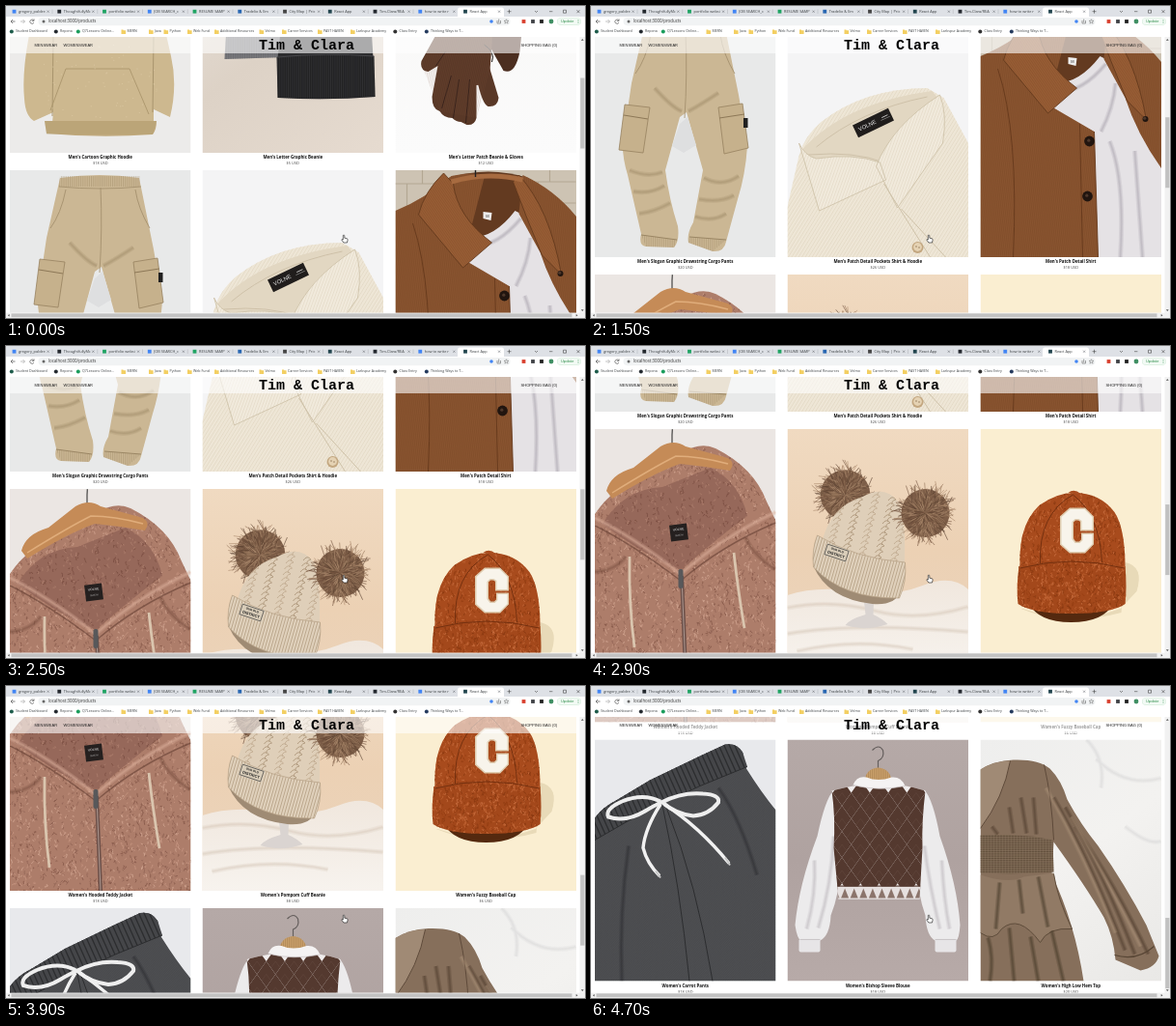
Recreate the animation shown at these times as an HTML page with a canvas. Size 600x323 px, loop 5 s.

```html
<!DOCTYPE html>
<html lang="en">
<head>
<meta charset="utf-8">
<title>React App</title>
<style>
html, body { margin: 0; width: 100%; height: 100%; overflow: hidden; background: #fff; }
canvas { display: block; width: 100vw; height: 100vh; }
</style>
</head>
<body>
<canvas id="stage"></canvas>
<script>
const W = 600, H = 323, LOOP = 5000, STEP = 100;
const CARD_W = 187.5, CARD_H = 250, PITCH = 268, FIRST_TOP = -98;
const COLS = [4, 203.5, 403.5];
const UI = '"Open Sans", "Noto Sans", sans-serif';
const SANS = '"Liberation Sans", Arial, sans-serif';
const MONO = '"Liberation Mono", "Courier New", monospace';

const canvas = document.getElementById('stage');
const c = canvas.getContext('2d');
const ratio = window.devicePixelRatio || 1;
canvas.width = W * ratio;
canvas.height = H * ratio;

// time, scroll offset
const SCROLL = [[0, 0], [600, 71], [800, 92], [900, 92], [1000, 96], [1100, 96],
  [1500, 160], [2000, 236], [2100, 248], [2200, 248], [2500, 290], [3300, 414],
  [3400, 424], [3500, 428], [3600, 428], [3700, 438], [3900, 476], [4600, 640], [4700, 650.5], [5000, 650.5]];

function scrollAt(t) {
  const i = SCROLL.findIndex(k => k[0] > t);
  const [t0, s0] = SCROLL[i - 1], [t1, s1] = SCROLL[i];
  return s0 + (s1 - s0) * (t - t0) / (t1 - t0);
}

let seed = 1;
const rnd = (a = 0, b = 1) => {
  seed = (seed * 16807) % 2147483647;
  return a + (b - a) * seed / 2147483647;
};

const rect = (x, y, w, h, col) => { c.fillStyle = col; c.fillRect(x, y, w, h); };
const fill = (d, col) => { c.fillStyle = col; c.fill(new Path2D(d)); };
const line = (d, col, w = 0.7) => { c.strokeStyle = col; c.lineWidth = w; c.stroke(new Path2D(d)); };
function pill(x, y, w, h, r, col) {
  c.fillStyle = col;
  c.beginPath();
  c.roundRect(x, y, w, h, r);
  c.fill();
}
function dot(x, y, r, col) {
  c.fillStyle = col;
  c.beginPath();
  c.arc(x, y, r, 0, 7);
  c.fill();
}
function text(s, x, y, size, col = '#333', align = 'left', font = UI, weight = 400) {
  c.font = `${weight} ${size}px ${font}`;
  c.textAlign = align;
  c.textBaseline = 'middle';
  c.fillStyle = col;
  c.fillText(s, x, y);
}
function within(d, draw) {
  c.save();
  c.clip(new Path2D(d));
  draw();
  c.restore();
}
function turned(x, y, a, draw) {
  c.save();
  c.translate(x, y);
  c.rotate(a);
  draw();
  c.restore();
}
function fade(stops, x1 = 0, y1 = CARD_H) {
  const g = c.createLinearGradient(0, 0, x1, y1);
  stops.forEach((s, i) => g.addColorStop(i / (stops.length - 1), s));
  return g;
}
const backdrop = col => rect(0, 0, CARD_W, CARD_H, col);

// Parallel fabric ribs inside a shape
function ribs(d, col, gap, angle = 0, w = 0.5) {
  within(d, () => turned(94, 125, angle, () => {
    for (let x = -170; x < 170; x += gap) line(`M${x},-170V170`, col, w);
  }));
}
// Soft wide folds along a path
function folds(d, col) {
  for (const w of [5, 2.8, 1.2]) line(d, col, w);
}
function fleece(d, base, cols, n, x0, y0, x1, y1) {
  fill(d, base);
  within(d, () => {
    for (let i = 0; i < n; i++) {
      const x = rnd(x0, x1), y = rnd(y0, y1);
      line(`M${x},${y}q${rnd(-3, 3)},${rnd(-3, 3)} ${rnd(-2, 2)},${rnd(0, 4)}`, cols[i % cols.length], 0.9);
    }
  });
}
function pompom(x, y, r) {
  dot(x, y, r * 0.78, '#7d5e48');
  const cols = ['#5b4232', '#94745a', '#ab8a6d', '#72533f'];
  for (let i = 0; i < 420; i++) {
    const a = rnd(0, 6.283), p = rnd(0, 0.75) * r, q = p + rnd(0.15, 0.4) * r, b = a + rnd(-0.3, 0.3);
    line(`M${x + p * Math.cos(a)},${y + p * Math.sin(a)}L${x + q * Math.cos(b)},${y + q * Math.sin(b)}`, cols[i % 4], 0.6);
  }
}
function tag(x, y, a, w, h, name) {
  turned(x, y, a, () => {
    rect(-w / 2, -h / 2, w, h, '#201d1c');
    text(name, -w / 6, 0, w / 7, '#eee', 'center', SANS);
    rect(w / 4, -1.5, w / 6, 0.8, '#ccc');
    rect(w / 5, 1, w / 4, 0.6, '#999');
  });
}

function hoodie() {
  backdrop('#ecebea');
  fill('M22,118Q12,165 15,194Q16,212 25,217L45,208L43,230H149L149,205L166,213Q174,180 167,150L158,110Z', '#cdb88f');
  line('M45,130L44,212M149,130L148,208', '#a8946d', 1);
  line('M58,163H124L144,210M58,163L42,206', '#ab966d', 0.9);
  fill('M36,217H152Q152,226 148,231Q94,235 38,230Z', '#c1aa7e');
  ribs('M36,217H152L148,231H38Z', '#a9946b', 2);
  within('M22,118H160L149,215H43Z', () => {
    for (let i = 0; i < 90; i++) dot(rnd(25, 155), rnd(128, 214), 0.5, '#dcc9a4');
  });
}
function letterBeanie() {
  backdrop(fade(['#e8e2dc', '#ddd2c6', '#e6dbd0'], CARD_W, CARD_H));
  const grey = 'M26,100H120V150L23,153Z', cuff = 'M77,151Q128,146 178,150L179,192Q130,196 78,193Z';
  fill(grey, '#77777b');
  ribs(grey, '#626267', 2.4);
  fill('M84,100H174L177,152H78Z', '#2d2d2f');
  fill(cuff, '#222223');
  ribs(cuff, '#3f3f42', 2.2);
  line('M78,151Q128,146 178,150', '#464649', 1);
}
function gloves() {
  backdrop(fade(['#f7f6f5', '#fbfbfb']));
  const brown = '#593827';
  fill('M96,95H134L129,145Q124,170 112,165L95,135Z', '#4c2e20');
  fill('M52,110H102L98,165Q94,180 84,180L84,214Q82,222 74,221L68,218Q63,218 59,214Q50,214 46,207Q38,205 38,192L44,160L34,166Q25,165 27,155Z', brown);
  fill('M84,172Q90,200 96,202Q106,203 107,193L94,150Z', brown);
  line('M48,204L58,170M60,214L66,174M73,219L77,174M42,160L52,145', '#36211a', 1);
  ribs('M52,110H102L98,165L84,214L46,207L27,158Z', 'rgba(125,85,63,.35)', 1.8, 0.2);
  line('M92,138Q104,146 100,156', '#1d1715', 1);
}

function cargoPants() {
  backdrop('#e8e9e9');
  fill('M52,8Q93,2 134,8L149,82L158,135Q156,165 148,190L136,234Q134,245 122,244L97,235Q95,226 102,214L112,160L95,100L88,105L73,160Q77,190 86,218Q88,233 82,240L53,239Q45,238 48,226L34,165Q28,145 29,130L38,70Z', '#cbb794');
  fill('M88,112L80,135L92,142L105,134L96,105Z', '#dedfe0');
  ribs('M52,6H135V17H51Z', '#a18c69', 2.2);
  line('M51,17Q94,21 136,17M94,18Q96,60 93,106M58,20Q53,45 42,60M130,20Q133,40 145,60', '#a08c6a', 0.8);
  folds('M36,160Q55,168 70,162M40,182Q58,185 72,176M46,205Q62,203 78,194M113,168Q132,178 149,166M108,190Q130,194 144,186M104,208Q122,214 136,205M62,75Q80,95 90,99M128,80Q110,92 97,99', 'rgba(150,130,95,.2)');
  const pockets = 'M31,92L57,95L50,142L25,139ZM128,95L153,91L159,137L134,143Z';
  fill(pockets, '#c6b18c');
  line(pockets, '#978260', 0.8);
  line('M30,103L55,107M129,106L155,102', '#8d7857', 1);
  rect(154, 106, 4.5, 10, '#202020');
  line('M48,227L85,232M98,229L136,232', '#9b8765', 1.2);
  ribs('M48,227L85,232L82,240L53,239ZM98,229L136,232L122,244L97,235Z', '#a38f6c', 2.2);
}
function cordShirt() {
  backdrop('#f4f4f5');
  const body = 'M0,198L12,145Q18,124 35,110Q80,75 145,75L162,85L187.5,132V250H0Z';
  fill(body, '#eee6d6');
  ribs(body, '#ddd2bd', 3, 0.55);
  fill('M16,138Q60,90 150,78L158,88Q110,108 96,152L30,160Z', '#e2d7c2');
  line('M30,136Q75,98 145,84M22,144Q70,140 100,152', '#c9bca3', 0.8);
  tag(89, 111, -0.45, 41, 14, 'VOLNE');
  const collar = 'M12,132Q18,145 30,148Q68,142 96,152L102,170L33,202ZM158,82Q166,102 161,132L114,199L92,156Q108,114 158,82Z';
  fill(collar, '#f1eadc');
  ribs(collar, '#dfd4c0', 2.8, 0.35);
  line(collar, '#c8baa0', 0.7);
  line('M100,174L148,250M118,200L164,250', '#cfc2a9', 1);
  dot(135, 240, 6, '#c3a780');
  dot(135, 239.5, 4.4, '#e5d2b3');
  dot(133.5, 239, 0.7, '#846b4b');
  dot(136.5, 240, 0.7, '#846b4b');
}
function brownShirt() {
  backdrop('#cdc3b3');
  line('M0,14H60M28,0V14M12,14V38M130,12H187M160,0V12M148,12V34M140,34H187', '#b3a793', 1.2);
  const left = 'M0,42Q30,30 58,6Q85,0 92,8L70,92L118,120L122,250H0Z';
  const right = 'M132,5Q165,20 187.5,48V158Q162,122 150,85L128,45Z';
  fill('M55,8Q96,-5 138,8L150,60L80,78L55,60Z', '#633a20');
  fill('M60,66Q95,80 124,42L140,50L187.5,150V250H118V122L74,95Z', '#e5e2e5');
  folds('M66,76Q98,88 130,50M134,130Q150,170 145,250M160,140L168,250M125,120Q138,95 140,70', 'rgba(150,142,156,.18)');
  fill(left, '#895430');
  fill(right, '#895430');
  ribs(left + right, 'rgba(86,46,20,.25)', 2, 0.12);
  const collar = 'M50,3Q30,22 24,46L70,101L100,75Q64,48 60,14ZM128,5Q160,40 172,108L152,88Q136,50 122,12Z';
  fill(collar, '#975d35');
  ribs(collar, 'rgba(92,50,22,.28)', 2, -0.6);
  line(collar, '#5f361b', 0.8);
  line('M58,12Q95,1 132,10', '#a76b40', 5);
  line('M83,0V7', '#222', 1.4);
  fill('M91,43L100,44L99,52L91,50Z', '#eee');
  text('M', 95.5, 48, 4, '#333', 'center', SANS);
  line('M103,112L106,250M118,120L122,250M18,55Q40,120 34,250', '#66391c', 0.9);
  for (const [x, y] of [[113, 130], [111, 187], [171, 107]]) {
    dot(x, y, x > 150 ? 3 : 5.4, '#21150f');
    dot(x - 0.7, y - 0.8, 1.6, '#4d372a');
  }
}

function teddyJacket() {
  backdrop('#ebe6e3');
  line('M80,17V6Q79,0 83,-4', '#222', 1);
  const furCols = ['#8a5c4c', '#c4947f', '#966858', '#cfa28e'];
  fleece('M0,88Q22,55 60,48Q100,8 125,20Q165,40 178,75L187.5,95V250H0Z', '#ad7d6a', furCols, 2600, 0, 10, 188, 250);
  fleece('M8,98Q30,62 70,60L120,40Q150,55 158,90Q128,112 89,146Q50,130 8,98Z', '#96685a', ['#7d5145', '#ac7d6c'], 600, 8, 40, 158, 150);
  const trim = 'M0,92Q40,112 89,150Q132,112 187.5,86';
  folds(trim, 'rgba(218,176,156,.25)');
  line('M0,100Q40,120 89,157Q132,120 187.5,97', 'rgba(100,62,50,.6)', 1.4);
  fill('M12,64Q16,47 40,40L68,18Q82,10 94,18L138,30Q146,35 140,43Q110,38 88,36Q60,46 18,72Z', '#c58b57');
  line('M18,66Q60,40 84,28Q108,28 138,36', '#e0ad7b', 1.4);
  folds('M0,148Q22,146 32,132M187,145Q165,132 156,112', 'rgba(110,70,57,.2)');
  line('M90,152L94,250', '#6b4f48', 4);
  line('M90,152L94,250', '#b6a29a', 0.9);
  pill(86.5, 145, 5, 20, 2, '#58585a');
  line('M36,132Q35,180 41,226M144,128Q148,165 155,206', '#dac5ae', 2.8);
  turned(87, 107, -0.12, () => {
    rect(-9, -8.5, 18, 17, '#25201f');
    text('VOLNE', 0, -3, 3.4, '#eee', 'center', SANS);
    text('SIZE M', 0, 3, 2.6, '#bbb', 'center', SANS);
  });
}
function pompomBeanie() {
  backdrop(fade(['#f0dac1', '#ecd1b4', '#ead4bd']));
  fill('M0,172Q30,162 70,168T140,162T187.5,166V250H0Z', fade(['#eee0d0', '#eee3d8', '#f7f3ee']));
  folds('M0,185Q45,176 90,188T187,184M0,212Q70,200 187,210M10,230Q70,216 130,228', 'rgba(205,188,172,.18)');
  fill('M78,165L81,192Q64,197 60,203Q80,210 104,202Q98,196 89,192L90,165Z', '#dad4d1');
  pompom(60, 68, 33);
  const dome = 'M36,116Q45,80 78,70Q100,58 114,74Q124,86 121,150L112,168Z';
  fill(dome, '#dfcfb9');
  within(dome, () => {
    for (let k = 0; k < 6; k++) for (let j = 0; j < 14; j++) {
      const x = 40 + k * 15 + j * 1.5, y = 125 - j * 6 + k * 9;
      line(`M${x},${y}q4,-6 8,-1q-5,1 -4,5`, k % 2 ? '#b39d82' : '#c4af95', 1);
    }
  });
  fill('M27,142Q42,176 88,181Q112,183 117,168Q70,165 27,142Z', '#9f8b74');
  const cuff = 'M31,110Q70,134 122,138Q124,158 116,175Q58,176 27,143Q25,125 31,110Z';
  fill(cuff, '#e0d1bc');
  ribs(cuff, '#b7a287', 3, 0.28, 0.8);
  line(cuff, '#b5a085', 0.7);
  pompom(143, 87, 32);
  turned(51, 128, 0.32, () => {
    rect(-12.5, -6.5, 25, 13, '#d9cdb9');
    line('M-11.5,-5.5H11.5V5.5H-11.5Z', '#333', 0.6);
    text('OUR OLD', 0, -2.5, 3, '#222', 'center', SANS, 700);
    text('DISTRICT', 0, 2.2, 4, '#222', 'center', SANS, 700);
  });
}
function fuzzyCap() {
  backdrop('#faeed1');
  fill('M42,186Q90,206 145,186L162,168Q170,142 150,138L146,190Q95,204 44,186Z', '#e8dab8');
  fill('M50,180H138Q128,200 94,200Q60,200 50,180Z', '#54290f');
  const cols = ['#8a3911', '#bd6030', '#963f14', '#c76d3e'];
  fleece('M42,155Q36,102 61,79Q79,66 97,66Q124,66 139,86Q151,104 150,152Z', '#a84b1d', cols, 850, 36, 64, 152, 158);
  fleece('M40,142Q94,128 150,142Q152,164 150,181Q136,191 94,191Q54,191 39,181Q37,164 40,142Z', '#a3481b', cols, 800, 36, 130, 152, 192);
  line('M41,144Q94,130 149,144M96,68Q124,90 126,138M96,68Q60,88 62,139', '#74300f', 1);
  fill('M91,66Q97,61 104,67Z', '#a84b1d');
  const letter = 'M93,83H108L116,91V104H105V95L102,93H98L95,96V114L98,118H103L106,115V109H116V119L108,127H93L84,119V91Z';
  line(letter, '#dfcdb1', 3);
  fill(letter, '#f8f4eb');
}

function carrotPants() {
  backdrop('#e8e9ec');
  const body = 'M0,81Q8,70 22,63L57,42L109,17L135,5Q147,3 153,13L157,30Q172,54 187.5,73V250H0Z';
  const band = 'M0,81Q8,70 22,63L57,42L109,17L135,5Q147,3 153,13L158,28L109,48L47,77L0,104Z';
  fill(body, '#4a4b4e');
  ribs(body, 'rgba(110,110,115,.2)', 1.7, 0.75);
  fill(band, '#454649');
  ribs(band, '#2c2d2f', 5, -0.42, 1.3);
  line('M0,104L47,77L109,48L158,28M70,68Q88,150 98,250M74,70Q106,150 122,250', '#2c2d2f', 1);
  folds('M128,50Q150,80 168,140M35,110Q25,180 28,250', 'rgba(30,31,33,.15)');
  line('M68,64Q50,55 28,64Q10,72 14,80Q32,86 52,74Q62,68 69,65Q90,54 112,56Q130,57 128,65Q118,78 102,79Q84,77 70,65', '#eeeeee', 4);
  line('M68,67Q52,92 50,112Q54,128 67,141M72,67Q108,90 139,128', '#f1f1f1', 3.4);
  line('M63,136L68,143M135,122L140,130', '#c9c9c9', 2);
}
function bishopBlouse() {
  backdrop(fade(['#b5a9a7', '#afa2a0', '#b7aaa8']));
  line('M94,33V22Q101,19 99,11Q95,4 88,11', '#655f5d', 1.2);
  fill('M48,52Q39,62 31,100Q12,150 8,192Q10,206 14,208L34,208Q44,203 45,182Q54,160 55,130ZM142,52Q151,62 158,100Q176,150 179,192Q178,206 175,208L153,208Q144,203 143,182Q135,160 134,130Z', '#ecebec');
  folds('M28,125Q30,160 20,196M48,100Q46,150 32,195M160,125Q162,165 168,196M142,110Q147,150 158,196', 'rgba(170,160,166,.16)');
  pill(12, 206, 22, 14, 2, '#e7e5e7');
  pill(153, 206, 22, 14, 2, '#e7e5e7');
  line('M13,207H34M153,207H175', '#c8c3c6', 0.9);
  const wood = 'M80,42Q82,30 94,29Q106,30 108,42Z';
  fill(wood, '#c99f6a');
  ribs(wood, '#a17b4d', 2);
  const vest = 'M46,53Q72,46 94,45Q122,46 143,53Q139,85 140,112L137,165H53L48,112Q50,80 46,53Z';
  fill(vest, '#f0eded');
  within(vest, () => {
    for (let row = 0; row < 8; row++) for (let k = -3; k < 4; k++) {
      const x = 95 + k * 19.2 + (row % 2) * 9.6, y = 55 + row * 13.4;
      fill(`M${x},${y - 13.4}l9.6,13.4l-9.6,13.4l-9.6,-13.4Z`, '#54392f');
      line(`M${x},${y}l19.2,26.8M${x},${y}l-19.2,26.8`, 'rgba(120,95,85,.4)', 0.5);
      row++;
      fill(`M${x},${y}`, '#54392f');
      row--;
    }
  });
  within(vest, () => {
    rect(46, 152, 100, 14, '#e6e0df');
    rect(46, 151, 100, 1.2, '#54392f');
    for (let x = 50; x < 142; x += 9.6) fill(`M${x},154l4,10h-8Z`, '#8b746b');
  });
  fill('M68,47Q72,37 82,39Q94,44 108,39Q118,38 122,48Q94,54 68,47Z', '#f5f3f3');
  line('M68,47Q94,54 122,48', '#c9c2c3', 0.7);
}
function hemTop() {
  backdrop(fade(['#eeeeed', '#f3f2f0', '#e9e8e6'], CARD_W, CARD_H));
  folds('M120,20Q150,50 187,40M110,0Q130,20 125,50M150,90Q175,110 187,105', 'rgba(200,199,197,.15)');
  fill('M0,31Q14,22 34,21Q60,20 72,30Q84,42 90,62Q104,88 122,110Q150,150 172,192L185,224Q182,236 166,239L140,228Q138,204 128,184Q108,150 76,106L74,140Q98,190 107,250H0Z', '#866f5b');
  fill('M0,31Q14,22 31,22Q24,60 0,92Z', '#a08a75');
  line('M31,22Q24,60 0,92M66,26Q74,60 76,104', '#5e4a3a', 1);
  const band = 'M0,99Q40,97 75,104L76,137Q40,140 0,138Z';
  fill(band, '#7b6652');
  ribs(band, '#5a4836', 2.3, 1.57, 0.7);
  ribs(band, 'rgba(160,138,115,.35)', 3, 0, 0.6);
  folds('M30,70L34,97M42,60L48,97M55,60L58,98M12,90L18,98M76,60Q112,120 150,218M88,70Q128,140 160,222M98,90Q140,150 174,222', 'rgba(70,52,38,.22)');
  folds('M68,50Q108,120 140,200M94,80Q134,150 166,214', 'rgba(185,160,136,.15)');
  fill('M0,140Q30,150 45,142L76,138Q80,165 95,196Q70,194 62,210Q40,180 22,196Q14,210 0,200Z', '#917a65');
  line('M76,139Q80,165 95,196Q70,194 62,210Q40,180 22,196Q14,210 0,200', '#5a4837', 0.9);
  folds('M40,145L44,180M60,142L70,194M20,148L16,196M8,205Q14,225 10,250M30,195L35,250M52,204L60,250M74,198L86,250', 'rgba(66,50,37,.24)');
  line('M139,223Q162,230 180,214', '#574534', 1.2);
}

const ROWS = [
  [[hoodie, "Men's Cartoon Graphic Hoodie", 18], [letterBeanie, "Men's Letter Graphic Beanie", 5], [gloves, "Men's Letter Patch Beanie & Gloves", 12]],
  [[cargoPants, "Men's Slogan Graphic Drawstring Cargo Pants", 20], [cordShirt, "Men's Patch Detail Pockets Shirt & Hoodie", 26], [brownShirt, "Men's Patch Detail Shirt", 18]],
  [[teddyJacket, "Women's Hooded Teddy Jacket", 18], [pompomBeanie, "Women's Pompom Cuff Beanie", 8], [fuzzyCap, "Women's Fuzzy Baseball Cap", 6]],
  [[carrotPants, "Women's Carrot Pants", 18], [bishopBlouse, "Women's Bishop Sleeve Blouse", 18], [hemTop, "Women's High Low Hem Top", 20]],
];

function products(scroll) {
  ROWS.forEach((row, r) => {
    const top = FIRST_TOP + r * PITCH - scroll;
    if (top > 318 || top + PITCH < 32) return;
    row.forEach(([draw, title, price], k) => {
      seed = 77 + r * 31 + k * 7;
      c.save();
      c.translate(COLS[k], top);
      within(`M0,0H${CARD_W}V${CARD_H}H0Z`, draw);
      text(title, CARD_W / 2, 255, 4.4, '#111', 'center', UI, 700);
      text(`$${price} USD`, CARD_W / 2, 261, 3.9, '#444', 'center');
      c.restore();
    });
  });
}

function siteHeader() {
  rect(0, 32, 594.5, 17, 'rgba(255,255,255,.6)');
  text('MENSWEAR', 29.5, 41, 4, '#222', 'left', SANS);
  text('WOMENSWEAR', 59.5, 41, 4, '#222', 'left', SANS);
  text('Tim & Clara', 311.5, 41.3, 15, '#000', 'center', MONO, 700);
  text('SHOPPING BAG (0)', 533.5, 41, 4.1, '#222', 'left', SANS);
}

const TABS = [['gregory_palden', '#4285f4'], ['ThoughtfullyMa', '#24292f'], ['portfolio websi', '#1fa463'],
  ['JOB SEARCH_c', '#4285f4'], ['RESUME SAMP', '#1fa463'], ['Tradelio & Em', '#2867b2'], ['City Map | Pric', '#444'],
  ['React App', '#21444e'], ['Tim-Clara/REA', '#24292f'], ['how to write r', '#4285f4'], ['React App', '#21444e']];
const MARKS = [[10, 'Student Dashboard', '#1d5b4a'], [56, 'Repona', '#24292f'], [79, 'Q7Lessons Online...', '#1a9c5b'],
  [125.5, 'MERN'], [154, 'Java'], [169.5, 'Python'], [194, 'Web Fund'], [222, 'Additional Resources'], [268.5, 'Velmo'],
  [292, 'Career Services'], [329, 'PAST HAVEN'], [363, 'Larkspur Academy'], [407.5, 'Class Entry', '#333'], [440, 'Thinking Ways to T...', '#243a5e']];

function browser() {
  rect(0, 0, W, 11, '#dee1e6');
  rect(0, 11, W, 21, '#fff');
  pill(468, 1.5, 48, 12, 2.5, '#fff');
  TABS.forEach(([name, col], i) => {
    const x = 1 + i * 46.75;
    rect(x + 5.6, 3.8, 3.8, 3.8, col);
    within(`M${x + 11},0h28.5v11h-28.5Z`, () => text(name, x + 12, 5.7, 3.9, '#3c4043'));
    line(`M${x + 41.5},4.6l2.2,2.2m0,-2.2l-2.2,2.2`, '#5f6368', 0.5);
    if (i < 9) line(`M${x + 47},3.5V8`, '#a4a8ad', 0.4);
  });
  line('M519.5,5.7h4m-2,-2v4M548,5l1.5,1.5l1.5,-1.5M563,5.7h3.4M577.5,4.2h3v3h-3ZM591.5,4.2l3,3m0,-3l-3,3', '#444', 0.6);

  line('M9.5,16H5m2,-2l-2,2l2,2', '#555', 0.7);
  line('M15,16h4.5m-2,-2l2,2l-2,2', '#aaa', 0.7);
  line('M28.7,15a2.1,2.1 0 1 0 .2,2M29,13.4v2h-2', '#555', 0.7);
  pill(33.5, 11.9, 489, 8.3, 4.1, '#f1f3f4');
  dot(39, 16, 1.5, '#666');
  text('localhost:3000/products', 44, 16, 4.4, '#333');
  dot(503, 16, 1.8, '#4285f4');
  line('M509,15v3h3.5v-3M510.7,17v-3.5', '#666', 0.6);
  line('M518.5,13.8l.7,1.5h1.7l-1.3,1.1l.5,1.7l-1.6,-1l-1.6,1l.5,-1.7l-1.3,-1.1h1.7Z', '#666', 0.5);
  [[536.5, '#d9402f'], [546, '#3f4145'], [555, '#222']].forEach(([x, col]) => rect(x - 1.9, 14.1, 3.8, 3.8, col));
  dot(565, 16, 2.4, '#3f8f63');
  pill(571, 12.2, 25, 7.7, 3.8, '#ceead6');
  pill(571.4, 12.6, 24.2, 6.9, 3.4, '#f2faf4');
  text('Update', 575, 16, 3.9, '#188038');
  for (const y of [14.4, 16, 17.6]) dot(593, y, 0.45, '#188038');

  MARKS.forEach(([x, name, col]) => {
    if (col) dot(x - 4.2, 26.5, 2, col);
    else fill(`M${x - 6},24.6h1.8l.6,.7h2.2v3.6h-4.6Z`, '#f3cf62');
    text(name, x, 26.5, 3.6, '#3c4043');
  });
}

function scrollbars(scroll) {
  rect(594.5, 32, 5.5, 286, '#f1f1f1');
  rect(0, 317.7, W, 5.3, '#f1f1f1');
  rect(595.2, 74.5 + scroll * 0.2545, 4.2, 73, '#c1c1c1');
  rect(5.5, 318.4, 581, 3.8, '#c1c1c1');
  fill('M597.3,34l1.4,1.8h-2.8ZM597.3,316l1.4,-1.8h-2.8ZM1.8,320.3l1.8,-1.3v2.6ZM592.5,320.3l-1.8,-1.3v2.6Z', '#555');
}

function hand() {
  const d = 'M349.3,237.4q.9,-.8 1.5,.2v2.6l2.4,.5q1,.3 .9,1.4l-.6,2.9h-3.6l-2.2,-3q.2,-1 1.6,0Z';
  fill(d, '#fff');
  line(d, '#111', 0.6);
}

let shown = -1;
function frame(now) {
  const t = Math.floor((now % LOOP) / STEP) * STEP;
  if (t !== shown) {
    shown = t;
    const scroll = scrollAt(t);
    c.setTransform(ratio, 0, 0, ratio, 0, 0);
    rect(0, 0, W, H, '#fff');
    within('M0,32H594.5V317.7H0Z', () => { products(scroll); siteHeader(); });
    browser();
    scrollbars(scroll);
    hand();
  }
  requestAnimationFrame(frame);
}
requestAnimationFrame(frame);
</script>
</body>
</html>
```
